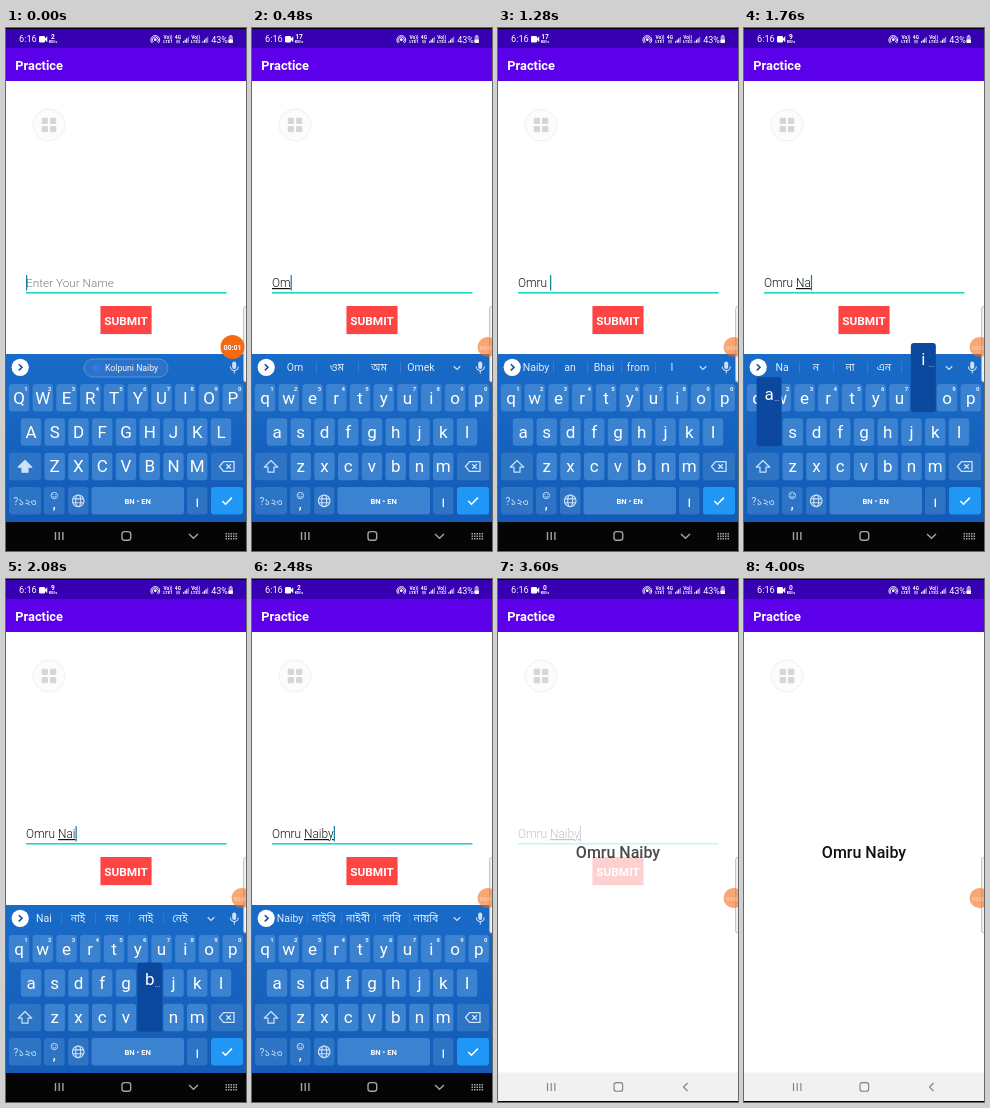
Recreate the animation shown at these times as an HTML page. Size 240 px wide and 523 px high, loop 4160 ms.

```html
<!DOCTYPE html>
<html lang="en">
<head>
<meta charset="utf-8">
<title>Practice</title>
<style>
html, body { margin: 0; width: 100%; height: 100%; overflow: hidden; background: #fff; }
svg { display: block; width: 240px; height: 523px; }
text { font-family: Roboto, "Noto Sans Bengali", "Noto Sans", sans-serif; white-space: pre; }
</style>
</head>
<body>
<svg id="stage" viewBox="0 0 240 523">
  <defs>
    <linearGradient id="board" x2="0" y2="1">
      <stop offset="0" stop-color="#196bc8"/><stop offset="1" stop-color="#135bb6"/>
    </linearGradient>
  </defs>
</svg>
<script>
const LOOP = 4160, STEP = 80;
const FIRST = 'Omru', LAST = 'Naiby', FULL = FIRST + ' ' + LAST;

// [time, typed letters]
const TYPING = [[0, 0], [240, 1], [400, 2], [720, 3], [880, 4], [1120, 5],
  [1600, 6], [1760, 7], [1840, 8], [2160, 9], [2400, 10]];
// [key, press, release]
const PRESSES = [['o', 160, 240], ['m', 320, 400], ['r', 640, 720], ['u', 800, 880],
  ['space', 1040, 1120], ['shift', 1360, 1440], ['n', 1520, 1600], ['a', 1680, 1840],
  ['i', 1760, 1920], ['b', 2080, 2160], ['y', 2320, 2400]];
const SPEED = [[0, '2'], [400, '17'], [1440, '9'], [2400, '2'], [3440, '0']];
const HINTS = {
  1: 'O ও অ Oh', 2: 'Om ওম অম Omek', 3: 'Omr ওমর অমর Omra', 4: 'Omru ওমরু অমরু Omrut',
  5: 'Naiby an Bhai from I', 6: 'N ন এন না ণ', 7: 'Na ন না এন নে', 8: 'Nai নাই নয় নাই নেই',
  9: 'Naib নাইব নাইবে নাব নায়ব', 10: 'Naiby নাইবি নাইবী নাবি নায়বি'
};
const KB_HIDE = 2880, TAP = 3280, OPEN = 3440, OPENED = 3680;

const stage = document.getElementById('stage');

function add(parent, tag, attrs = {}, text) {
  const node = document.createElementNS('http://www.w3.org/2000/svg', tag);
  set(node, attrs);
  if (text !== undefined) node.textContent = text;
  parent.appendChild(node);
  return node;
}
function set(node, attrs) {
  for (const k in attrs) node.setAttribute(k, attrs[k]);
}
const group = parent => add(parent, 'g');
const rect = (p, x, y, width, height, fill, rx = 0) =>
  add(p, 'rect', { x, y, width, height, fill, rx });
const circle = (p, cx, cy, r, fill, more = {}) => add(p, 'circle', { cx, cy, r, fill, ...more });
const line = (p, d, stroke, width = 1, more = {}) =>
  add(p, 'path', { d, stroke, 'stroke-width': width, fill: 'none', ...more });
const label = (p, x, y, size, fill, text, more = {}) =>
  add(p, 'text', { x, y, 'font-size': size, fill, ...more }, text);
const MID = { 'text-anchor': 'middle' };
const BOLD = { 'font-weight': 700 }, LIGHT = { 'font-weight': 300 };
const show = (node, on) => { node.style.display = on ? '' : 'none'; };
const at = (table, t) => table.filter(row => row[0] <= t).pop()[1];
const ramp = (t, a, b) => Math.min(1, Math.max(0, (t - a) / (b - a)));

// --- page -------------------------------------------------------------
rect(stage, 0, 0, 240, 523, '#fff');

const form = group(stage);
const hint = label(form, 20, 259, 11.8, '#7c7c7c', 'Enter Your Name', LIGHT);
const field = label(form, 20, 259, 11.9, '#111', '', LIGHT);
const head = add(field, 'tspan');
const tail = add(field, 'tspan', { 'text-decoration': 'underline' });
rect(form, 20, 264, 200.5, 1.6, '#1fd6c2');
const caret = rect(form, 20, 247, 1.2, 15.5, '#0d7f9c');
rect(form, 94.2, 278.6, 51.6, 28.2, '#00000018', 1);
const button = rect(form, 94.5, 278, 51, 28, '#ff4444');
label(form, 120, 296.8, 11.8, '#fff', 'SUBMIT', { ...MID, ...BOLD });

const result = group(stage);
rect(result, 0, 53, 240, 441, '#fff');
label(result, 120, 279.4, 16, '#111', FULL, { ...MID, 'font-weight': 500 });

// --- bars at the top ---------------------------------------------------
rect(stage, 0, 0, 240, 21, '#3700b3');
rect(stage, 0, 20, 240, 33, '#5c00ea');
rect(stage, 0, 0, 240, 1, '#000');
label(stage, 9.3, 41.6, 12.8, '#fff', 'Practice', BOLD);

const status = group(stage);
label(status, 13, 14.4, 9.2, '#fff', '6:16');
rect(status, 33, 8, 6, 6.4, '#fff', 1.2);
line(status, 'M41 8.7v5l-2.5-2.5z', '#fff', .5, { fill: '#fff' });
const speed = label(status, 47, 11.2, 6.6, '#fff', '', { ...MID, ...BOLD });
label(status, 47, 15, 4, '#fff', 'KB/s', { ...MID, ...BOLD });
circle(status, 149.3, 11.7, 1.4, '#fff');
line(status, 'M147.3 14.2a3 3 0 1 1 4 0M146.3 15.2a4.4 4.4 0 1 1 6 0', '#fff', .9);
function sim(x, n) {
  label(status, x, 10.8, 4.8, '#fff', 'Vo))', { ...MID, ...BOLD });
  label(status, x, 15, 4.4, '#fff', 'LTE' + n, { ...MID, ...BOLD });
}
function bars(x) {
  for (let i = 0; i < 4; i++) rect(status, x + i * 1.6, 13.2 - i * 1.5, 1.1, 1.5 + i * 1.5, i < 3 ? '#fff' : '#ffffff88');
}
sim(162, 1);
label(status, 172, 11, 5, '#fff', '4G', { ...MID, ...BOLD });
line(status, 'M171 15.2v-3.4m2 0v3.4', '#fff', .9);
bars(177);
sim(189.7, 2);
bars(196.3);
label(status, 205.2, 14.5, 9, '#fff', '43%');
rect(status, 222.5, 8, 4.4, 7, '#ffffff88', .8);
rect(status, 223.7, 7.2, 2, 1, '#fff');
rect(status, 222.5, 11.5, 4.4, 3.5, '#fff', .8);

// --- floating grid button ----------------------------------------------
circle(stage, 43, 97, 16, '#fcfcfc', { stroke: '#f0f0f0' });
for (const x of [35.7, 44]) for (const y of [89.7, 98]) rect(stage, x, y, 6.3, 6.3, '#d6d6d6', 1.3);

// --- system bar --------------------------------------------------------
const nav = rect(stage, 0, 493.5, 240, 29.5, '#000');
const navIcons = add(stage, 'g', { fill: 'none' });
add(navIcons, 'path', { d: 'M49.5 504v8m3.7-8v8m3.7-8v8' });
add(navIcons, 'rect', { x: 116, y: 503.6, width: 8.7, height: 8.7, rx: 2.5 });
const backArrow = add(navIcons, 'path');
const kbIcon = add(navIcons, 'path', {
  d: 'M219.5 505.7h11.5m-11.5 2.5h11.5m-11.5 2.5h11.5', 'stroke-dasharray': '1.5 1'
});
rect(stage, 0, 522, 240, 1, '#000');

// --- keyboard ----------------------------------------------------------
const KEY = '#3b82d0', SIDE = '#2d74c5', SOFT = '#cde2f9';
const kb = group(stage);
rect(kb, 0, 326, 240, 168, 'url(#board)');
circle(kb, 14.2, 339.3, 8.6, '#fff');
line(kb, 'M12.8 336.2l3.2 3.1-3.2 3.1', '#164e97', 1.6);
const more = line(kb, 'M201.7 338.3l3.3 3.2 3.3-3.2', SOFT, 1.2);
rect(kb, 226.2, 333.5, 4, 7.5, SOFT, 2);
line(kb, 'M224.3 338.5a4 4 0 0 0 8 0M228.3 342.5v3', SOFT, 1.1);

const chip = group(kb);
set(rect(chip, 78, 331, 84, 18, '#2c72c8', 9), { stroke: '#5f9bdf', 'stroke-width': .8 });
circle(chip, 90.5, 340, 4, '#2a7be6');
label(chip, 99, 343, 8.7, '#f2f8ff', 'Kolpuni Naiby');

const words = Array.from({ length: 5 }, () => label(kb, 0, 343.4, 10.5, '#dfedfd', '', MID));
const rules = Array.from({ length: 4 }, () => rect(kb, 0, 334, .7, 11, '#3f82d2'));

const keys = {};
const makeKey = (x, y, w, fill) => rect(kb, x, y, w, 27.5, fill, 3);

[['qwertyuiop', 13, 356], ['asdfghjkl', 25, 390.3], ['zxcvbnm', 48.7, 424.7]].forEach(([row, x0, y], r) => {
  [...row].forEach((ch, i) => {
    const x = x0 + i * 23.75;
    makeKey(x - 10.2, y, 20.4, KEY);
    keys[ch] = { x, y, text: label(kb, x, y + 19.7, 17, '#fff', ch, MID) };
    if (r === 0) label(kb, x + 7, y + 6.9, 6, '#eaf3fe', (i + 1) % 10, { ...MID, ...BOLD });
  });
});

const shiftKey = makeKey(3, 424.7, 32, SIDE);
const shiftArrow = line(kb, 'M19 432.5l-6.8 6.7h3.8v5h6v-5h3.8z', SOFT, 1.2, { 'stroke-linejoin': 'round' });
makeKey(205, 424.7, 32, SIDE);
line(kb, 'M213.5 438.5l4-4.8h10.5v9.6h-10.5zM220.3 436.2l4.6 4.6m0-4.6l-4.6 4.6', SOFT, 1.3);

makeKey(3, 459, 32, SIDE);
label(kb, 19, 476.5, 10.2, SOFT, '?১২৩', MID);
makeKey(38, 459, 20.5, SIDE);
circle(kb, 48.3, 467.5, 3.2, 'none', { stroke: SOFT, 'stroke-width': .9 });
line(kb, 'M46.6 468.3q1.7 1.8 3.4 0M47 466.2v.9m2.6-.9v.9', SOFT, .8);
label(kb, 48.3, 481, 12, '#fff', ',', { ...MID, ...BOLD });
makeKey(62, 459, 20.5, SIDE);
circle(kb, 72.2, 472.8, 5.8, 'none', { stroke: SOFT, 'stroke-width': 1.2 });
add(kb, 'ellipse', { cx: 72.2, cy: 472.8, rx: 2.5, ry: 5.8, fill: 'none', stroke: SOFT, 'stroke-width': 1.1 });
line(kb, 'M67 470.9h10.4m-10.4 3.8h10.4', SOFT, 1.1);
const spaceKey = makeKey(85.5, 459, 92.5, KEY);
label(kb, 131.7, 475.6, 7.6, '#fff', 'BN • EN', { ...MID, ...BOLD });
makeKey(181, 459, 20.5, SIDE);
line(kb, 'M191.3 470.5v8.5', '#fff', 1.3);
makeKey(205, 459, 32, '#2097f5');
line(kb, 'M216.3 473l3.2 3.2 6.4-6.6', '#fff', 1.6);

const popups = PRESSES.filter(p => keys[p[0]]).map(([ch, from, to]) => {
  const { x, y } = keys[ch], g = group(kb);
  rect(g, x - 12.4, y - 41, 25, 69, '#0d489f', 3);
  const text = label(g, x, y - 18.6, 17, '#fff', ch, MID);
  label(g, x + 8, y - 17, 7, '#fff', '...', MID);
  return { g, ch, text, from, to };
});

// --- edge handle and recorder bubble -----------------------------------
set(rect(stage, 237.7, 278.5, 6, 75.5, '#f4f4f4', 2), { stroke: '#b5b5b5', 'stroke-width': .9 });
const bubble = group(stage);
const disc = circle(bubble, 0, 0, 12, '#f56a14');
const clock = label(bubble, 0, 2.5, 7, '#fff', '', { ...MID, ...BOLD });

// --- drawing -----------------------------------------------------------
function drawHints(n) {
  const list = n ? HINTS[n].split(' ') : [];
  const five = list.length === 5;
  const x0 = five ? 38 : 43, gap = five ? 34 : 42;
  words.forEach((w, i) => {
    w.textContent = list[i] || '';
    w.setAttribute('x', x0 + i * gap);
  });
  rules.forEach((r, i) => {
    r.setAttribute('x', x0 + (i + .5) * gap);
    show(r, i < list.length - 1);
  });
  show(chip, !n);
  show(more, n);
}

function drawKeys(t) {
  const upper = t < 240 || (t >= 1440 && t < 1600);
  const down = name => PRESSES.some(([k, a, b]) => k === name && t >= a && t < b);
  for (const ch in keys) keys[ch].text.textContent = upper ? ch.toUpperCase() : ch;
  for (const p of popups) {
    show(p.g, t >= p.from && t < p.to);
    p.text.textContent = upper ? p.ch.toUpperCase() : p.ch;
  }
  shiftArrow.setAttribute('fill', upper ? SOFT : 'none');
  shiftKey.setAttribute('fill', down('shift') ? '#5c9ae0' : SIDE);
  spaceKey.setAttribute('fill', down('space') ? '#5c9ae0' : KEY);
}

function drawField(t, n) {
  const typed = FULL.slice(0, n), cut = typed.lastIndexOf(' ') + 1;
  head.textContent = typed.slice(0, cut);
  tail.textContent = typed.slice(cut);
  show(hint, !n);
  const end = n ? field.getComputedTextLength() : 0;
  caret.setAttribute('x', 20 + end);
  show(caret, t < KB_HIDE || t >= 3360);
  button.setAttribute('fill', t >= TAP && t < OPEN ? '#ff7272' : '#ff4444');
}

function drawNav(t, open) {
  const grey = open ? '#a4a4a4' : t < 2960 ? '#cfcfcf' : t < 3040 ? '#a8a8a8' : '#808080';
  nav.setAttribute('fill', open ? '#050505' : '#f1f1f1');
  set(navIcons, { stroke: grey, 'stroke-width': open ? 1.4 : 1.1 });
  backArrow.setAttribute('d', open ? 'M183 506l4.5 4.3 4.5-4.3' : 'M189.5 504l-4 4 4 4');
  show(kbIcon, open);
}

function drawBubble(t) {
  const k = ramp(t, 160, 480);
  bubble.setAttribute('transform', `translate(${226.5 + 9 * k} 319)`);
  set(disc, { r: 12 - 2 * k, opacity: 1 - .4 * k });
  clock.textContent = '00:0' + (1 + Math.floor((t + 360) / 1000));
  set(clock, { 'font-size': 7 - k, opacity: 1 - .6 * k });
}

function draw(time) {
  const t = Math.floor((time % LOOP) / STEP) * STEP;
  const n = at(TYPING, t), open = t < KB_HIDE;
  speed.textContent = at(SPEED, t);
  drawField(t, n);
  drawNav(t, open);
  drawBubble(t);
  show(kb, open);
  if (open) {
    drawHints(n);
    drawKeys(t);
  }
  result.setAttribute('opacity', ramp(t, OPEN - STEP, OPENED));
}

const start = performance.now();
function tick() {
  draw(performance.now() - start);
  requestAnimationFrame(tick);
}
tick();
</script>
</body>
</html>
```
